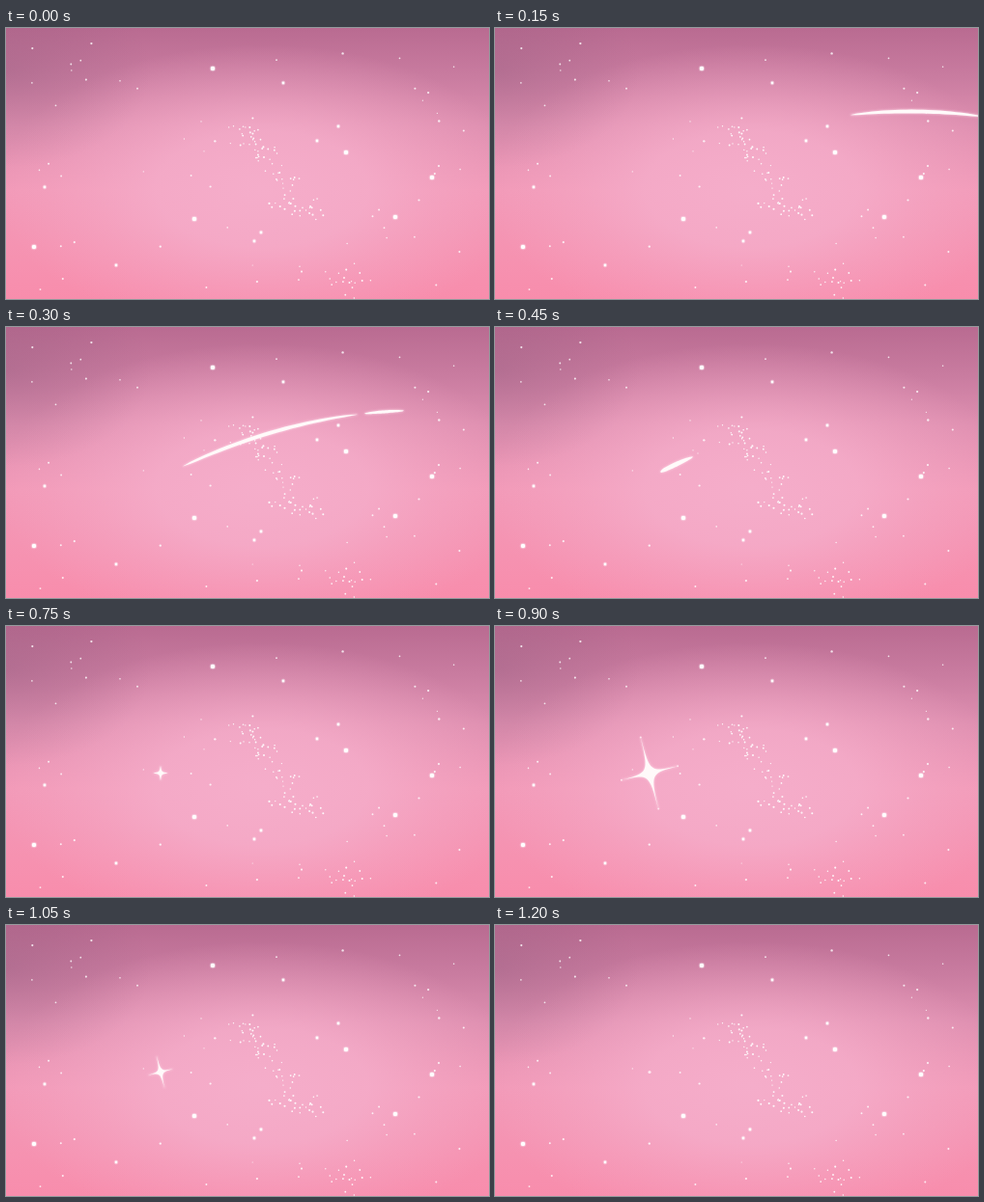
Write an HTML page that moves like this. It is 500 by 281 pixels and loops after 1350 ms.

```html
<!DOCTYPE html>
<html lang="en">
<head>
<meta charset="utf-8">
<title>Shooting star</title>
<style>
html, body { margin: 0; width: 100%; height: 100%; overflow: hidden; background: #f3a0bf; }
svg { display: block; width: 100%; height: 100%; }
</style>
</head>
<body>
<svg viewBox="0 0 500 281" preserveAspectRatio="none">
  <defs>
    <linearGradient id="sky" x1="0" y1="0" x2="0" y2="1">
      <stop offset="0" stop-color="#b96b91"/>
      <stop offset=".18" stop-color="#c97ca0"/>
      <stop offset=".36" stop-color="#de8fb0"/>
      <stop offset=".6" stop-color="#f29ab8"/>
      <stop offset="1" stop-color="#f88dac"/>
    </linearGradient>
    <radialGradient id="haze">
      <stop offset="0" stop-color="#f5adca"/>
      <stop offset=".4" stop-color="#f5adca" stop-opacity=".82"/>
      <stop offset=".65" stop-color="#f5abc8" stop-opacity=".45"/>
      <stop offset="1" stop-color="#f5a8c6" stop-opacity="0"/>
    </radialGradient>
    <radialGradient id="shade">
      <stop offset="0" stop-color="#8a5677" stop-opacity=".32"/>
      <stop offset="1" stop-color="#8a5677" stop-opacity="0"/>
    </radialGradient>
    <filter id="soft" x="-20%" y="-50%" width="140%" height="200%">
      <feGaussianBlur stdDeviation="1.2"/>
    </filter>
  </defs>
  <rect width="500" height="281" fill="url(#sky)"/>
  <ellipse cx="265" cy="167" rx="275" ry="150" fill="url(#haze)"/>
  <ellipse cx="0" cy="45" rx="150" ry="100" fill="url(#shade)"/>
  <g id="stars" fill="#fff"></g>
  <path id="glow" fill="#ffdbe9" stroke="#ffdbe9" opacity=".7" filter="url(#soft)"/>
  <path id="light" fill="#fffafa"/>
  <g id="sparks" fill="#ffe6ef"></g>
</svg>
<script>
const STEP = 150, LOOP = 1350, W = 500, H = 281;
const find = id => document.getElementById(id);
const dot = ([x, y], r, a = 1) =>
  `<circle cx="${x.toFixed(1)}" cy="${y.toFixed(1)}" r="${r.toFixed(2)}" opacity="${a}"/>`;
const repeat = (n, make) => Array.from({ length: n }, (_, i) => make(i)).join("");

let seed = 17;
const rnd = () => (seed = seed * 16807 % 2147483647) / 2147483647;
const spread = size => (rnd() + rnd() - 1) * size;

function drawStars() {
  const large = [[214, 42], [29, 227], [403, 196], [441, 155], [352, 129], [195, 198]];
  const medium = [[287, 57], [344, 102], [322, 117], [264, 212], [257, 221], [40, 165], [114, 246]];
  const spine = [[246, 108], [257, 122], [274, 132], [286, 157], [288, 182], [316, 184]];
  const glowing = r => p => dot(p, r + 1, .25) + dot(p, r);
  const cluster = (n, [x, y], w, h) =>
    repeat(n, () => dot([x + spread(w), y + spread(h)], .65 + rnd() * .4, .9));

  find("stars").innerHTML =
    large.map(glowing(2.3)).join("") + medium.map(glowing(1.4)).join("") +
    spine.map(p => cluster(13, p, 18, 18)).join("") +
    cluster(18, [352, 262], 40, 24) +
    repeat(60, () => dot([8 + rnd() * 482, 8 + rnd() * 266], .6 + rnd() * .6, .8));
}

// Tapered stroke along the flight arc; skew below 1 moves the bulk toward the head
const arcY = x => 86.5 + .00095 * (x - 430) ** 2;
function streak(head, tail, half, skew = 1) {
  const upper = [], lower = [];
  for (let i = 0; i <= 24; i++) {
    const u = i / 24, x = head + (tail - head) * u;
    const w = half * Math.max(0, Math.sin(Math.PI * u ** skew)) ** .5;
    upper.push(`${x.toFixed(1)} ${(arcY(x) - w).toFixed(2)}`);
    lower.unshift(`${x.toFixed(1)} ${(arcY(x) + w).toFixed(2)}`);
  }
  return `M${upper.concat(lower).join("L")}Z`;
}

// Four-pointed star; waist sets how far the edges stay from the centre
const CENTER = [160, 152.5];
function around(r, quarter, tilt) {
  const a = (quarter * 90 + tilt) * Math.PI / 180;
  return [CENTER[0] + r * Math.sin(a), CENTER[1] - r * Math.cos(a)];
}
function sparkle(long, short, tilt, waist) {
  const tips = [0, 1, 2, 3].map(k => around(k % 2 ? short : long, k, tilt));
  const edges = tips.map((_, k) => {
    const c = around(waist, k + .5, tilt);
    return `C${c} ${c} ${tips[(k + 1) % 4]}`;
  });
  return { d: `M${tips[0]}${edges.join("")}Z`, tips };
}

// The meteor flies in, shrinks to a point, flares as a star and fades
function pose(step) {
  switch (step) {
    case 1: return { d: streak(368, W + 6, 1.9) };
    case 2: return { d: streak(183, 364, 2, .8) + streak(371, 412, 1.5) };
    case 3: return { d: streak(171, 205, 2.6, .75), sparks: dot([210, 131], .8, .7) };
    case 4: return sparkle(4, 4, 0, 1.5);
    case 5: return sparkle(7.5, 7.5, 0, 1.6);
    case 6: {
      const star = sparkle(38, 30, -14, 1);
      return { d: star.d, sparks: star.tips.map(p => dot(p, 1)).join("") };
    }
    case 7: return sparkle(17, 13, -14, 1);
    case 8: return { sparks: dot(CENTER, 1.6) };
    default: return {};
  }
}

function render(ms) {
  const { d = "", sparks = "" } = pose(Math.floor(ms % LOOP / STEP));
  find("glow").setAttribute("d", d);
  find("light").setAttribute("d", d);
  find("sparks").innerHTML = sparks;
}

drawStars();
const start = performance.now();
function tick() {
  render(performance.now() - start);
  requestAnimationFrame(tick);
}
tick();
</script>
</body>
</html>
```
